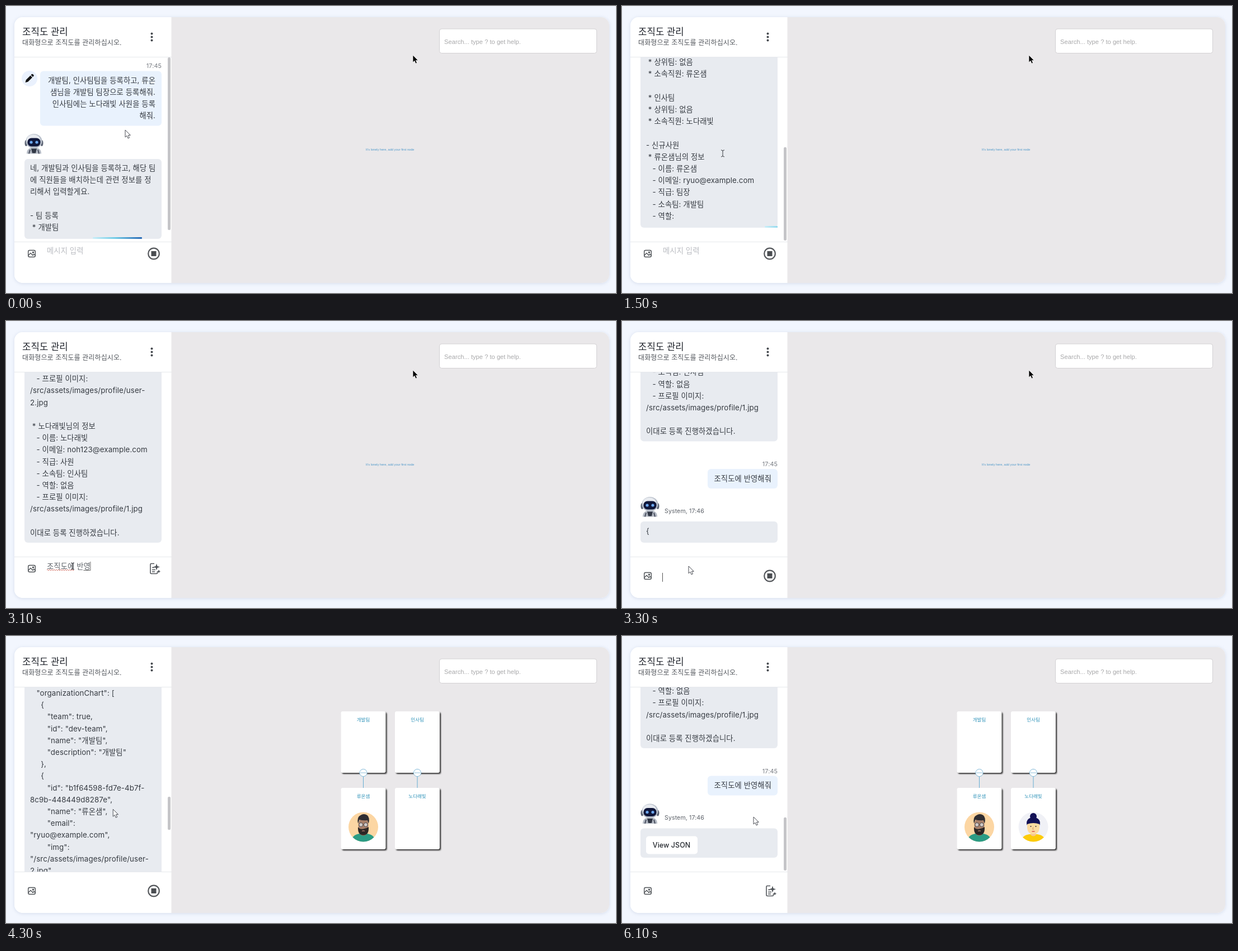
Animation, 1090 px wide and 514 px high, one loop 6.2 s. Source, as an HTML page:

```html
<!DOCTYPE html>
<html lang="ko">
<head>
<meta charset="utf-8">
<title>조직도 관리</title>
<style>
  html, body { margin: 0; width: 100%; height: 100%; overflow: hidden; background: #f2f6fe; }
  svg { display: block; width: 100%; height: 100%; }
  text { font-family: Inter, "Noto Sans CJK KR", sans-serif; font-size: 13.3px; letter-spacing: .1px; fill: #363b42; white-space: pre; }
  .arial { font-family: "Liberation Sans", Arial, sans-serif; letter-spacing: 0; }
  .card { fill: #fff; filter: drop-shadow(2.5px 2.5px 1px rgba(0, 0, 0, .8)); }
</style>
</head>
<body>
<svg viewBox="0 0 1090 514" xmlns="http://www.w3.org/2000/svg">
  <defs>
    <clipPath id="frame"><rect x="15" y="20" width="1063" height="476" rx="15"/></clipPath>
    <clipPath id="view"><rect x="15" y="92" width="281" height="330"/></clipPath>
    <clipPath id="round"><circle r="26.5"/></clipPath>
    <linearGradient id="glow"><stop offset="0" stop-color="#c9eef8"/><stop offset=".45" stop-color="#6fcbe6"/><stop offset="1" stop-color="#2467b5"/></linearGradient>
    <g id="robot">
      <path d="M-13 18Q-13 7 0 7T13 18Z" fill="#b4bac4"/>
      <path d="M-9 18L-7 11M9 18L7 11" stroke="#4a5060" stroke-width="2"/>
      <path d="M-5 9H5L3 17H-3Z" fill="#323846"/>
      <ellipse cx="-14" cy="-1" rx="2.5" ry="5.5" fill="#5d6575"/><ellipse cx="14" cy="-1" rx="2.5" ry="5.5" fill="#5d6575"/>
      <ellipse cy="-4.5" rx="14.5" ry="13" fill="#b9c0cb"/>
      <ellipse cx="-1" cy="-7" rx="12" ry="9.5" fill="#e8ebf0"/>
      <rect x="-11.5" y="-10" width="23" height="15" rx="7" fill="#10173a"/>
      <circle cx="-5" cy="-2.5" r="2.6" fill="#6da9f5"/><circle cx="5" cy="-2.5" r="2.6" fill="#6da9f5"/>
    </g>
    <g id="man" clip-path="url(#round)">
      <circle r="27" fill="#fcd6a3"/>
      <path d="M-22 28Q-21 14-7 12H7Q21 14 22 28Z" fill="#2c9c84"/>
      <path d="M-6 8H6V13Q0 18-6 13Z" fill="#966a51"/>
      <ellipse cy="-3" rx="9" ry="13" fill="#a9806a"/>
      <path d="M-9.5 0Q-6 5 0 3.5T9.5 0Q10.5 14.5 0 14.5T-9.5 0Z" fill="#2d2725"/>
      <path d="M-9.5-6Q-12-18-5-21Q1-25 7-21Q12-17 9.5-6L7-12Q0-11-7-13Z" fill="#2f2d31"/>
      <path d="M-2.5 7.5Q0 6 2.5 7.5" stroke="#a9776a" stroke-width="1.3" fill="none"/>
      <g fill="#d0c9c6" stroke="#4a4749"><circle cx="-4.3" cy="-4" r="3.5"/><circle cx="4.3" cy="-4" r="3.5"/></g>
    </g>
    <g id="woman" clip-path="url(#round)">
      <circle r="27" fill="#f0f1f6"/>
      <path d="M-23 28Q-21 15-7 13H7Q21 15 23 28Z" fill="#fccb0a"/>
      <path d="M-5 8H5V14Q0 19-5 14Z" fill="#f6c890"/>
      <circle cy="-19" r="6" fill="#131256"/>
      <ellipse cy="-7" rx="12" ry="10.5" fill="#131256"/>
      <path d="M-11-5Q0-9 11-5V2Q10 13 0 13T-11 2Z" fill="#fcdba0"/>
      <g fill="#34283a"><circle cx="-4.5" cy="-1" r="1"/><circle cx="4.5" cy="-1" r="1"/></g>
      <path d="M0 0L-1.5 4H1" stroke="#d89d6b" fill="none"/>
      <path d="M-2.5 8H2.5" stroke="#d9534a" stroke-width="1.5"/>
    </g>
    <path id="arrow" d="M0 0V13L3 10.3L5 15L7.4 14L5.4 9.4H9.3Z"/>
    <g id="ibeam" fill="none" stroke="#3c3f45"><path d="M-3-6Q0-6 0-4V4Q0 6-3 6M3-6Q0-6 0-4M0 4Q0 6 3 6"/></g>
    <g id="stop"><circle r="9.8" fill="none" stroke="#55585c" stroke-width="2.2"/><rect x="-4.5" y="-4.5" width="9" height="9" fill="#4b4e52"/></g>
    <g id="compose" fill="none" stroke="#505459" stroke-width="1.6">
      <path d="M0-9H-5.5Q-7-9-7-7.5V7.5Q-7 9-5.5 9H4Q5.5 9 5.5 7.5V5M-4-2H0M-4 2H2M-4 5.5H1"/>
      <path d="M4-9L5.5-4.5L10-3L5.5-1.5L4 3L2.5-1.5L-2-3L2.5-4.5ZM8 2L9 4L11 5L9 6L8 8L7 6L5 5L7 4Z" fill="#505459" stroke="none"/>
    </g>
    <g id="picture" fill="none" stroke="#4d5155" stroke-width="1.4"><rect x="-6.3" y="-6" width="12.6" height="12" rx="2.5"/><path d="M-6 3L-2-1L2 3L4 1L6 3"/><circle cx="2.5" cy="-2.3" r="1"/></g>
  </defs>

  <rect width="1090" height="514" fill="#f2f6fe"/>
  <rect x="15" y="20" width="1063" height="476" rx="15" fill="#fff" style="filter:drop-shadow(0 1px 3px rgba(90,110,150,.18))"/>
  <g clip-path="url(#frame)">
    <rect x="15" y="20" width="281" height="476" fill="#fff"/>
    <rect x="295.5" y="20" width="783" height="476" fill="#eae8ea"/>
  </g>
  <text x="29" y="52" style="font-size:16.7px;font-weight:500;fill:#20242c">조직도 관리</text>
  <text x="29" y="70.3" style="font-size:12px;fill:#50545a">대화형으로 조직도를 관리하십시오.</text>
  <g fill="#45494e"><circle cx="260.5" cy="49.5" r="2"/><circle cx="260.5" cy="55.5" r="2"/><circle cx="260.5" cy="61.5" r="2"/></g>
  <path d="M15 91.5H296M15 422.5H296" stroke="#e6e8ec"/>
  <rect x="774.5" y="41" width="281" height="43.5" rx="4" fill="#fff" stroke="#d2d0d3"/>
  <text class="arial" x="783" y="67.5" style="font-size:11.2px;fill:#a9a9ab">Search... type ? to get help.</text>
  <g id="chat" clip-path="url(#view)"></g>
  <g id="input"></g>
  <g id="chart"></g>
  <g id="pointer"></g>
</svg>
<script>
const LOOP = 6200, PITCH = 21.2, LATER = 806, TRACK = 328, LEAD = '류온샘', STAFF = '노다래빛';

const reply = `네, 개발팀과 인사팀을 등록하고, 해당 팀
에 직원들을 배치하는데 관련 정보를 정
리해서 입력할게요.

- 팀 등록
 * 개발팀
 * 상위팀: 없음
 * 소속직원: ${LEAD}

 * 인사팀
 * 상위팀: 없음
 * 소속직원: ${STAFF}

- 신규사원
 * ${LEAD}님의 정보
   - 이름: ${LEAD}
   - 이메일: ryuo@example.com
   - 직급: 팀장
   - 소속팀: 개발팀
   - 역할: 팀장
   - 프로필 이미지:
/src/assets/images/profile/user-
2.jpg

 * ${STAFF}님의 정보
   - 이름: ${STAFF}
   - 이메일: noh123@example.com
   - 직급: 사원
   - 소속팀: 인사팀
   - 역할: 없음
   - 프로필 이미지:
/src/assets/images/profile/1.jpg

이대로 등록 진행하겠습니다.`.split('\n');

const json = `{
   "organizationChart": [
     {
        "team": true,
        "id": "dev-team",
        "name": "개발팀",
        "description": "개발팀"
     },
     {
        "id": "b1f64598-fd7e-4b7f-
8c9b-448449d8287e",
        "name": "${LEAD}",
        "email":
"ryuo@example.com",
        "img":
"/src/assets/images/profile/user-
2.jpg",
        "role": "팀장",
        "pid": "dev-team"
     },
     {
        "team": true,
        "id": "hr-team",
        "name": "인사팀",
        "description": "인사팀"
     },
     {
        "name": "${STAFF}",
        "email":
"noh123@example.com",
        "img":
"/src/assets/images/profile/1.jpg",
        "pid": "hr-team"
     }
   ]
}`.split('\n');

// Moments at which the picture changes
const range = (a, b) => Array.from({ length: (b - a) / 100 + 1 }, (_, i) => a + i * 100);
const moments = [0, 100, ...range(300, 800), 1100, ...range(1300, 1600), 1900, 2100, 2200, ...range(2500, 2700),
  ...range(2900, 3500), 3700, 3800, ...range(4200, 4600), 4800, 4900, 5300, 5400, ...range(5600, 5800), 6100];

// [time, lines written]
const replyKeys = [[0, 6], [100, 6.5], [300, 8], [600, 11.5], [700, 12.9], [800, 13.67], [1100, 14.5], [1300, 16.5],
  [1500, 19.8], [1600, 21.3], [1900, 21.72], [2100, 24.6], [2200, 26.465], [2500, 29.5], [2600, 31.6], [2700, 34]];
const jsonKeys = [[3300, 1], [3400, 8], [3500, 19], [3700, 24], [3800, 26], [4500, 36]];
// [time, x, y]
const path = [[0, 213, 222], [100, 216, 226], [300, 240, 238], [500, 330, 245], [800, 470, 247], [1100, 470, 247],
  [1300, 330, 255], [1500, 180, 264], [1600, 132, 269], [2500, 132, 269], [2700, 121, 412], [2900, 119, 439],
  [3300, 119, 439], [3500, 140, 380], [3800, 165, 302], [4200, 165, 302], [4600, 270, 335], [4900, 285, 341],
  [5300, 285, 341], [5600, 255, 330], [5800, 237, 325], [6100, 235, 324]];
const typing = [[2900, '조'], [3000, '조직도에'], [3100, '조직도에 반영'], [3200, '조직도에 반영해줘']];

const last = (keys, t) => keys.filter(k => k[0] <= t).pop();
const between = (t, a, b) => t >= a && t < b;
function tween(keys, t) {
  const i = keys.findIndex(k => k[0] > t);
  if (i < 0) return keys[keys.length - 1].slice(1);
  if (!i) return keys[0].slice(1);
  const a = keys[i - 1], b = keys[i], f = (t - a[0]) / (b[0] - a[0]);
  return a.slice(1).map((v, n) => v + (b[n + 1] - v) * f);
}

const $ = id => document.getElementById(id);
const text = (x, y, s, style = '', extra = '') => `<text x="${x}" y="${y + 4.8}" style="${style}" ${extra}>${s}</text>`;
const box = (x, y, w, h, fill, r = 6, extra = '') =>
  `<rect x="${x}" y="${y}" width="${Math.max(0, w)}" height="${h}" rx="${r}" fill="${fill}" ${extra}/>`;
const use = (id, x, y, extra = '') => `<use href="#${id}" transform="translate(${x} ${y})" ${extra}/>`;
const right = 'text-anchor="end"';
const stamp = y => text(278, y - .8, '17:45', 'font-size:10.8px;fill:#777b82', right);
const write = (lines, count, y) => lines.map((s, i) =>
  text(43, y + i * PITCH, s.slice(0, Math.round(s.length * Math.min(1, Math.max(0, count - i)))))).join('');

const question = stamp(107) + box(61, 116.5, 217, 98, '#e9f2fd') +
  [`개발팀, 인사팀팀을 등록하고, ${LEAD.slice(0, 2)}`, `${LEAD.slice(2)}님을 개발팀 팀장으로 등록해줘.`,
    `인사팀에는 ${STAFF} 사원을 등록`, '해줘.'].map((s, i) => text(267, 133 + i * PITCH, s, '', right)).join('') +
  '<circle cx="42" cy="130" r="14" fill="#eaf1fd"/><path d="M34.5 137L35.8 132.3L43.6 124.5L47 127.9L39.2 135.7ZM44.5 123.6L46 122.1Q47 121.3 48 122.2L49.4 123.6Q50.2 124.6 49.4 125.5L47.9 127Z" fill="#111"/>' +
  use('robot', 50, 246.5);

function drawChat(t) {
  const [count] = tween(replyKeys, t), done = t >= 2700;
  const end = 290 + (Math.ceil(count) - 1) * PITCH + (done ? 18 : 21);
  let bottom = end;
  let out = question + box(33, 274, 245, end - 274, '#e8ebf0') + write(reply, count, 290);
  if (!done) {
    const head = 33 + (210 + t) % 700, from = Math.max(33, head - 88), to = Math.min(278, head);
    if (to > from) out += `<svg x="${from}" y="${end - 3}" width="${to - from}" height="3"><rect x="${head - 88 - from}" width="88" height="3" rx="1" fill="url(#glow)"/></svg>`;
  }
  if (t >= 3300) {
    const open = t < 4600, [rows] = tween(jsonKeys, t);
    const low = open ? 383 + (Math.ceil(rows) - 1) * PITCH : 397.5;
    bottom = low + LATER;
    out += `<g transform="translate(0 ${LATER})">` + stamp(242) + box(153, 251, 125, 35, '#e9f2fd') +
      text(267, 268, '조직도에 반영해줘', '', right) + use('robot', 50, 318.5) +
      text(76, 325, 'System, 17:46', 'font-size:10.6px;fill:#5c6168') + box(33, 345, 245, low - 345, '#e8ebf0') +
      (open ? write(json, rows, 362) : box(43, 359, 92, 32, '#fff', 5) +
        text(88.5, 374.5, 'View JSON', 'font-size:12.4px;font-weight:500;fill:#24282e', 'text-anchor="middle"')) + '</g>';
  }
  const scroll = !t ? 0 : between(t, 3800, 4600) ? 1087 : Math.max(0, bottom - 397);
  const height = bottom - 67, thumb = TRACK * 330 / height, top = 92 + scroll * TRACK / height;
  out = `<g transform="translate(0 ${-scroll})">${out}</g>`;
  if (between(t, 1600, 2700)) out += '<circle cx="253.5" cy="377" r="14" fill="#fff"/><path d="M248 376L253 371.5V374.3Q259 374.5 259 381Q257 377.8 253 377.8V380.5Z" fill="#222"/>';
  const wide = between(t, 400, 1300) || between(t, 4900, 5400);
  if (wide) out += box(283.5, 92, 11.5, 330, '#fafbfe', 0) + box(284, top, 10, thumb, '#a5a5a7', 4);
  else if (!between(t, 2900, 3700)) out += box(289, top, 5, thumb, '#c5c5c8', 2.5);
  $('chat').innerHTML = out;
}

function drawInput(t) {
  const y = t < 3300 ? 443.5 : 456.5, idle = between(t, 2700, 3300) || t >= 4600;
  let out = use('picture', 46, y) + use(idle ? 'compose' : 'stop', idle ? 265 : 264, y);
  if (t < 2900) out += text(73, 438, '메시지 입력', 'fill:#b9bbc0');
  else if (t < 3300) {
    const typed = last(typing, t)[1], x = 73 + typed.length * 12.2 - (typed.length > 4 ? 8 : 0);
    out += text(73, 439, typed, 'fill:#5d6268') + `<path d="M${x - 12} 446.5H${x}M${x + .5} 431V447" stroke="#666"/>`;
    if (typed.length > 4) out += `<path d="M73 446${'q1 -2 2 0t2 0'.repeat(12)}" fill="none" stroke="#d4776c"/>`;
  }
  if (between(t, 700, 1300)) out += '<path d="M72.5 431V447" stroke="#555"/>';
  if (between(t, 3300, 4200)) out += '<path d="M72.5 451V467" stroke="#555"/>';
  $('input').innerHTML = out;
}

const label = (x, y, s) => text(x, y - 1.6, s, 'font-size:8.5px;letter-spacing:0;fill:#2f93b9', 'text-anchor="middle"');
const card = (x, y, s) => box(x - 40, y, 80, 110, '#fff', 3, 'class="card"') + label(x, y + 15, s);
function branch(x, team, person, face) {
  let out = card(x, 135, team);
  if (person) out += card(x, 272, person) +
    `<path d="M${x} 251V272" stroke="#65aed3"/><circle cx="${x}" cy="245" r="6.6" fill="#fff" stroke="#82b9d8"/><path d="M${x - 5} 245H${x + 5}" stroke="#8dbfda"/>`;
  return out + (face ? use(face, x, 342) : '');
}
function drawChart(t) {
  const full = t >= 4300;
  $('chart').innerHTML = t < 3400
    ? '<text class="arial" x="643" y="259" style="font-size:5.68px;fill:#4f98c9">It\'s lonely here, add your first node</text>'
    : t < 3500 ? branch(687, '개발팀')
    : branch(full ? 638.5 : 642.5, '개발팀', LEAD, t >= 3700 && 'man') +
      branch(full ? 735 : 731, t >= 4200 ? '인사팀' : '', full && STAFF, t >= 4400 && 'woman');
}

function drawPointer(t) {
  const [x, y] = tween(path, t);
  const parked = t < 4200 ? use('arrow', 727, 88, 'stroke="#fff" stroke-width=".7"') : '';
  $('pointer').innerHTML = parked + (between(t, 1500, 3300) ? use('ibeam', x, y)
    : use('arrow', x, y, 'fill="#fff" stroke="#4a4d54"'));
}

let shown = -1;
function tick() {
  const now = performance.now() % LOOP, t = moments.filter(m => m <= now).pop();
  if (t !== shown) {
    shown = t;
    [drawChat, drawInput, drawChart, drawPointer].forEach(draw => draw(t));
  }
  requestAnimationFrame(tick);
}
tick();
</script>
</body>
</html>
```
